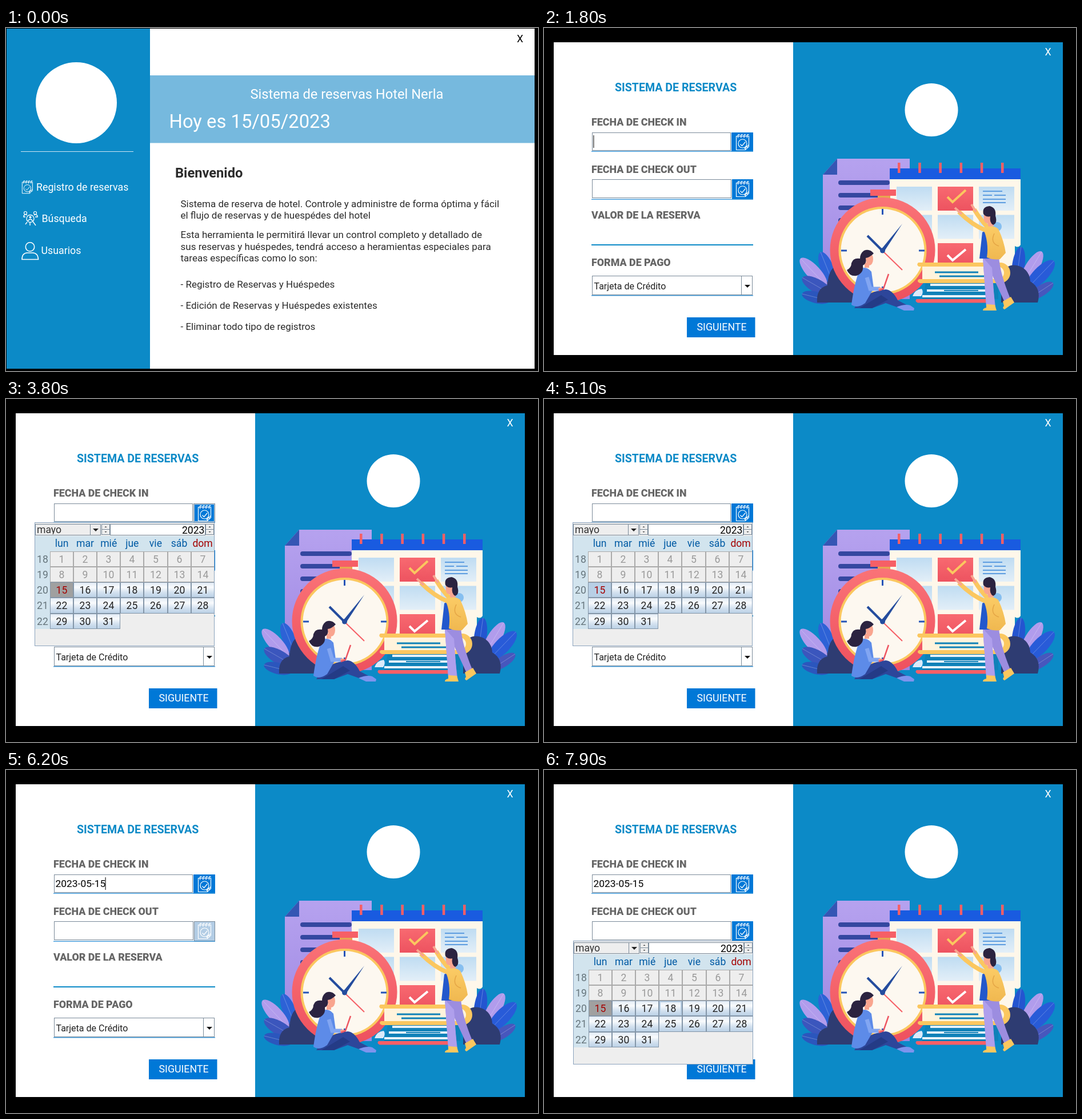
Recreate the animation shown at these times as an HTML page with a canvas. Size 931 px wide and 601 px high, loop 8000 ms.

```html
<!DOCTYPE html>
<html lang="es">
<head>
<meta charset="utf-8">
<title>Sistema de reservas</title>
<style>
  html, body { margin: 0; width: 100%; height: 100%; overflow: hidden; background: #000; }
  canvas { display: block; }
</style>
</head>
<body>
<canvas id="stage" width="931" height="601"></canvas>
<script>
const ctx = document.getElementById('stage').getContext('2d');
const LOOP = 8000;
const BLUE = '#0c8ac7', BAND = '#76b9de', BUTTON = '#0078d7', EDGE = '#7a8a99', PALE = '#b8cfe5', UNDERLINE = '#4a9fdc';
const RED = '#f65f66', YELLOW = '#fbc75f', CREAM = '#fef7ea', NAVY = '#2e3c72', LILAC = '#b19cec', INK = '#2b2340', SKIN = '#f9a58f';

const within = (t, ...spans) => spans.some(([from, to]) => t >= from && t < to);

function box(x, y, w, h, color) {
  ctx.fillStyle = color;
  ctx.fillRect(x, y, w, h);
}

function frame(x, y, w, h, color = EDGE) {
  ctx.strokeStyle = color;
  ctx.lineWidth = 1;
  ctx.strokeRect(x + .5, y + .5, w - 1, h - 1);
}

function text(s, x, y, size, color, weight = 400, align = 'left') {
  ctx.font = `${weight} ${size}px Roboto, sans-serif`;
  ctx.fillStyle = color;
  ctx.textAlign = align;
  ctx.fillText(s, x, y);
}

function fill(d, color) {
  ctx.fillStyle = color;
  ctx.fill(new Path2D(d));
}

function line(d, color, width = 1) {
  ctx.strokeStyle = color;
  ctx.lineWidth = width;
  ctx.stroke(new Path2D(d));
}

function oval(x, y, rx, ry, color, angle = 0) {
  ctx.beginPath();
  ctx.ellipse(x, y, rx, ry, angle, 0, 7);
  ctx.fillStyle = color;
  ctx.fill();
}

function ring(x, y, r, color, width = 1) {
  ctx.beginPath();
  ctx.arc(x, y, r, 0, 7);
  ctx.strokeStyle = color;
  ctx.lineWidth = width;
  ctx.stroke();
}

function shade(y, h, ...colors) {
  const g = ctx.createLinearGradient(0, y, 0, y + h);
  colors.forEach((c, i) => g.addColorStop(i / (colors.length - 1), c));
  return g;
}

function notebook(x, y, scale) {
  ctx.save();
  ctx.translate(x, y);
  ctx.scale(scale, scale);
  line('M1 5H23V23L17 29H1ZM17 29V24H23M8 19L11 22L17 15M15 27L23 20', '#fff', 1.2);
  ring(12, 18, 7.5, '#fff', 1.2);
  for (const rx of [4, 9.3, 14.6, 20]) line(`M${rx} 8V3a1.7 1.7 0 0 1 3 0`, '#fff', 1.3);
  ctx.restore();
}

// ---- Home screen ----
function drawHome(hover) {
  box(1, 1, 924, 596, '#fff');
  box(1, 1, 251, 596, BLUE);
  box(252, 83, 673, 118.5, BAND);
  oval(123, 131, 71, 71, '#fff');
  box(26, 216, 197, 1, '#cfe6f3');
  if (hover) box(1, 250.5, 251, 55, BAND);

  notebook(27.5, 266, .82);
  ring(42.5, 334, 6.5, '#fff', 1.3);
  oval(42.5, 331.5, 2, 2, '#fff');
  line('M38.5 338q4-6 8 0M47 339l5 7M34 331l-3 0v-2q3-4 6-1M51 331h4v-2q-3-4-6-1M37 340l-3 4M42 341v5', '#fff', 1.4);
  ring(34, 324, 2.5, '#fff', 1.2);
  ring(51, 324, 2.5, '#fff', 1.2);
  ring(42, 383.5, 7.7, '#fff', 1.6);
  line('M28 405.5q0-11 9-11.500h10q9 .5 9.500 11.500Z', '#fff', 1.6);
  text('Registro de reservas', 53, 285, 17.8, '#fff');
  text('Búsqueda', 62.5, 340, 17.8, '#fff');
  text('Usuarios', 61.5, 396, 17.8, '#fff');

  text('X', 899.5, 25, 17.8, '#000', 400, 'center');
  text('Sistema de reservas Hotel Nerla', 427.5, 124, 23.7, '#fff');
  text('Hoy es 15/05/2023', 285.5, 175, 32.8, '#fff');
  text('Bienvenido', 296, 262, 23.7, '#2b2b2b', 700);
  [
    ['Sistema de reserva de hotel. Controle y administre de forma óptima y fácil', 314],
    ['el flujo de reservas y de huespédes del hotel', 334],
    ['Esta herramienta le permitirá llevar un control completo y detallado de', 368],
    ['sus reservas y huéspedes, tendrá acceso a heramientas especiales para', 388.5],
    ['tareas específicas como lo son:', 409],
    ['- Registro de Reservas y Huéspedes', 455],
    ['- Edición de Reservas y Huéspedes existentes', 492],
    ['- Eliminar todo tipo de registros', 529]
  ].forEach(([s, y]) => text(s, 305.5, y, 17, '#2b2b2b'));
}

// ---- Illustration ----
function leaf(x, y, length, width, degrees, color) {
  const a = degrees * Math.PI / 180;
  const tipX = x + Math.sin(a) * length, tipY = y - Math.cos(a) * length;
  oval((x + tipX) / 2, (y + tipY) / 2, width / 2, length / 2, color, a);
  line(`M${x} ${y}L${tipX} ${tipY}`, '#ffffff55', .8);
}

function drawPlanner() {
  fill('M513 229H640V475H488V257Z', shade(229, 246, '#b6a2ef', '#9d87e2'));
  fill('M513 229V257H488Z', '#3556b4');
  for (let y = 267; y < 350; y += 22) {
    ctx.beginPath();
    ctx.roundRect(515, y, 90, 8, 4);
    ctx.fillStyle = '#3447a0';
    ctx.fill();
  }
  fill('M605 265H834V380q-4 6-10 2V440H605Z', CREAM);
  box(605, 246, 229, 19, '#195be0');
  for (let i = 0; i < 6; i++) box(619 + i * 36.2, 236, 4.5, 18, RED);
  for (let row = 0; row < 3; row++) {
    for (let col = 0; col < 3; col++) {
      const x = 617 + col * 72, y = 278 + row * 49.5;
      const marked = col === 1 && row !== 1;
      if (row < 2 || marked) box(x, y, 62, 42, marked ? shade(y, 42, '#f86970', '#ed5360') : shade(y, 42, '#bfdcf2', '#e3eff8'));
    }
  }
  line('M706 296L715 305L738 284', YELLOW, 4);
  line('M706 398L715 407L738 388', '#fff', 4);
  line('M768 286H802M768 293H784M788 293H808M768 300H808M768 306H808', '#5d9de0', 2);
}

function drawClock() {
  box(584, 293, 22, 9, '#e8a650');
  box(571, 283, 45, 11, RED);
  oval(592.5, 389, 92, 92, shade(297, 184, '#fa7377', '#ee505e'));
  oval(592.5, 390, 77, 77, YELLOW);
  oval(592.5, 390, 73, 73, '#fdf8f0');
  line('M592.5 317v10M592.5 453v10M520 390h10M656 390h10', '#2454b8', 3);
  line('M592 390L627 424', RED, 2);
  line('M592 390L566 364', '#244c9e', 4);
  fill('M590 388L627 343L595 392Z', '#244c9e');
  oval(592.5, 390, 4.5, 4.5, '#244c9e');
}

function drawPlants() {
  fill('M478 481q-8-25 14-33q-2-32 24-32q24 0 34 30v35Z', NAVY);
  leaf(508, 452, 64, 23, -22, '#2d62d6');
  leaf(494, 452, 66, 24, -43, LILAC);
  leaf(505, 468, 61, 24, -60, '#3b56bd');
  leaf(500, 478, 50, 20, -76, '#2b56bd');
  fill('M478 481q-2-25 18-30q2-35 22-35q22 0 32 30v35Z', NAVY);
  leaf(826, 446, 63, 22, 8, '#2455d0');
  leaf(836, 450, 68, 24, 31, LILAC);
  leaf(845, 457, 68, 26, 44, '#285bd8');
  leaf(849, 474, 50, 19, 57, '#4757bd');
  fill('M800 481V432q12-24 36-13q14 8 15 25q20 12 13 37Z', NAVY);
}

function drawBooks() {
  fill('M668 447H795V475H662Z', '#0f81b8');
  line('M676 450H785M670 460H782M662 470H775', '#e8f2fa', 4);
  line('M700 460H760', '#0f81b8', 2);
  fill('M652 475H780v6.500H654q-6-3-2-6.500Z', RED);
  fill('M655 411H798a17 17 0 0 1 0 36H658q-7-3-2-7H792a10 10 0 0 0 0-22H656q-5-3-1-7Z', YELLOW);
  fill('M662 418H794a11 11 0 0 1 0 22H662Z', '#fff3dc');
  line('M684 428H760M692 435H770', '#0f81b8', 3);
  fill('M645 470q4-12 16-13q4 6-1 13Z', '#dbeafa');
}

function drawSitter() {
  fill('M543 491Q560 462 598 458Q610 459 619 477L638 487L626 492L598 482L574 491Z', '#2d469a');
  fill('M552 491L590 468L602 476L574 491Z', '#243b86');
  fill('M617 489q14-6 24-3l7 5l-1 4H630Z', '#7d94ee');
  fill('M553 422Q564 416 573 427L577 456L562 482Q548 492 538 485Q543 446 553 422Z', '#5d8be8');
  line('M565 437L571 457L588 457', '#82a6f2', 7);
  oval(589, 457, 4, 2.5, SKIN);
  oval(569.5, 405, 6.5, 11, SKIN);
  box(561, 411, 8, 9, SKIN);
  fill('M577 395Q570 386 560 390Q553 395 553 404Q541 402 538 412Q538 420 530 424Q535 436 547 434Q560 429 558 416Q565 413 563 403Q570 402 577 395Z', INK);
  line('M586 460L594 457L603 431', '#ee5662', 2.5);
}

function drawStander() {
  oval(793, 348, 8, 8, '#86bff0');
  fill('M768 402L796 401Q798 430 816 474L806 480L783 430L790 488H774Z', '#9c8de0');
  fill('M768 402L784 420L789 488H774Z', '#af9fec');
  fill('M774 484L789 485L792 495H768q0-4 6-5Z', YELLOW);
  fill('M803 479L817 471L823 481L806 493Q801 491 805 487Z', YELLOW);
  fill('M767 358L779 352L782 404H762Z', '#2258cc');
  line('M774 355Q750 346 726 322M778 351Q763 335 753 318', YELLOW, 7.5);
  line('M731 326L719 315M756 322L748 309', SKIN, 4);
  fill('M768 350Q784 343 795 352Q805 373 808 394L798 405Q787 407 775 402Q779 375 768 350Z', shade(348, 58, '#fbcb65', '#f0b850'));
  line('M788 360Q780 377 796 382', '#e4a545', 1.5);
  fill('M770 327Q768 342 776 342L778 348L787 347L788 326Z', SKIN);
  fill('M769 326Q766 313 780 312Q792 315 790 329Q794 342 786 345Q779 341 781 330Q774 332 769 326Z', INK);
}

function drawIllustration() {
  drawPlanner();
  drawPlants();
  drawClock();
  drawBooks();
  drawSitter();
  drawStander();
}

// ---- Reservation form ----
function dateButton(x, y, h, state) {
  const w = 366 - x;
  box(x, y, w, h, state === 'down' ? '#b3cde5' : BUTTON);
  if (state === 'hover') frame(x + 1, y + 1, w - 2, h - 2, PALE);
  if (state) frame(x, y, w, h);
  notebook(335.5, y + 1.5, 1);
}

function drawForm(view) {
  box(17, 25, 419, 548, '#fff');
  box(436, 25, 472, 548, BLUE);
  oval(678, 143.5, 46.5, 46.5, '#fff');
  text('X', 882, 48, 17.8, '#fff', 400, 'center');
  drawIllustration();

  text('SISTEMA DE RESERVAS', 124, 111, 19.6, BLUE, 700);
  [['FECHA DE CHECK IN', 171], ['FECHA DE CHECK OUT', 254], ['VALOR DE LA RESERVA', 334], ['FORMA DE PAGO', 416.5]]
    .forEach(([s, y]) => text(s, 83, y, 17.85, '#666', 900));

  frame(84, 183, 243, 32);
  frame(84, 265, 244, 33);
  dateButton(328, 183, 33, view.inButton);
  dateButton(329, 265, 35, view.outButton);
  box(83, 215.5, 283, 1.5, UNDERLINE);
  box(83, 299.5, 283, 1.5, UNDERLINE);
  box(83, 379, 283, 2, BLUE);
  if (view.date) text(view.date, 86.5, 205.3, 17.4, '#000');
  if (view.caret) box(view.date ? 173.5 : 86.3, 188, 1.2, 22, '#222');

  frame(84, 434, 281, 34);
  box(345, 434, 1, 34, EDGE);
  box(83, 468, 283, 1.5, UNDERLINE);
  fill('M351 450H361L356 455Z', '#111');
  text('Tarjeta de Crédito', 87.5, 457.5, 16, '#222');
  box(250, 507, 119.5, 35, BUTTON);
  text('SIGUIENTE', 267.5, 530, 17.8, '#fff');
}

// ---- Date picker ----
function spinner(x) {
  box(x, 3, 15, 19, '#eee');
  frame(x, 3, 15, 10);
  frame(x, 12, 15, 10);
  fill(`M${x + 5.5} 9h4l-2-2ZM${x + 5.5} 16h4l-2 2Z`, '#444');
}

function dayCell(day, hot, pressed) {
  const index = day - 1, col = index % 7, row = Math.floor(index / 7);
  const x = Math.round(27 + col * 41.1), y = Math.round(50.5 + row * 27.3);
  const w = Math.round(27 + (col + 1) * 41.1) - x, h = Math.round(50.5 + (row + 1) * 27.3) - y;
  const enabled = day >= 15;
  let color = '#eee';
  if (enabled) color = shade(y, h, '#dfe9f4', '#f9fbfd', '#d3e1ef', '#b8cfe5');
  if (day === 15) color = pressed ? PALE : '#a0a0a0';
  box(x, y, w, h, color);
  frame(x, y, w, h, enabled ? '#8496a8' : '#aaa');
  if (hot) {
    frame(x + 1, y + 1, w - 2, h - 2, PALE);
    frame(x + 2, y + 2, w - 4, h - 4, PALE);
  }
  text(day, x + w / 2, y + 20, 17.6, day === 15 ? '#a40000' : enabled ? '#222' : '#999', 400, 'center');
}

function drawPicker(x, y, hotDay, pressed) {
  ctx.save();
  ctx.translate(x, y);
  box(0, 0, 315, 217, '#eee');
  box(1, 24, 313, 27, '#d2e4ee');
  box(1, 51, 26, 136, '#d2e4ee');

  frame(1, 3, 115, 20);
  frame(97, 3, 19, 20);
  fill('M102 11H112L107 16Z', '#222');
  ctx.save();
  ctx.beginPath();
  ctx.rect(2, 4, 94, 17);
  ctx.clip();
  text('mayo', 4, 18.5, 17.6, '#333');
  ctx.restore();
  spinner(117);
  box(132, 3, 167, 20, '#fff');
  frame(132, 3, 167, 20);
  text('2023', 297.5, 20, 17.6, '#000', 400, 'right');
  spinner(299);

  ['lun', 'mar', 'mié', 'jue', 'vie', 'sáb', 'dom'].forEach((name, i) =>
    text(name, 47.5 + i * 41.1, 43, 17.6, i === 6 ? '#a40000' : '#005aa4', 400, 'center'));
  for (let i = 0; i < 5; i++) text(18 + i, 14, 70.5 + i * 27.3, 17.6, '#66757c', 400, 'center');
  for (let day = 1; day <= 31; day++) dayCell(day, day === hotDay && !pressed, pressed);
  frame(0, 0, 315, 217, '#8ba3bd');
  ctx.restore();
}

// ---- Timeline ----
function buttonState(t, down, ...hovers) {
  return within(t, down) ? 'down' : within(t, ...hovers) ? 'hover' : '';
}

function hoveredDay(t) {
  const steps = [[7900, 18], [6900, 19], [6700, 18], [5200, 0], [4800, 15], [4700, 16], [4500, 23]];
  return (steps.find(([from]) => t >= from) || [0, 0])[1];
}

function draw(t) {
  box(0, 0, 931, 601, '#000');
  if (t < 1800) return drawHome(t >= 600);
  drawForm({
    date: t >= 5200 ? '2023-05-15' : '',
    caret: within(t, [1800, 2300], [2800, 3200], [3700, 3800], [5200, 5600], [6100, 6300]),
    inButton: buttonState(t, [3500, 3800], [2700, 3500], [3800, 4400]),
    outButton: buttonState(t, [6200, 6300], [5900, 6200], [6300, 6500])
  });
  if (within(t, [3800, 5200])) drawPicker(50, 216, hoveredDay(t), t >= 5100);
  if (t >= 6300) drawPicker(51, 299, hoveredDay(t), false);
}

const start = performance.now();
function tick() {
  draw((performance.now() - start) % LOOP);
  requestAnimationFrame(tick);
}
tick();
</script>
</body>
</html>
```
